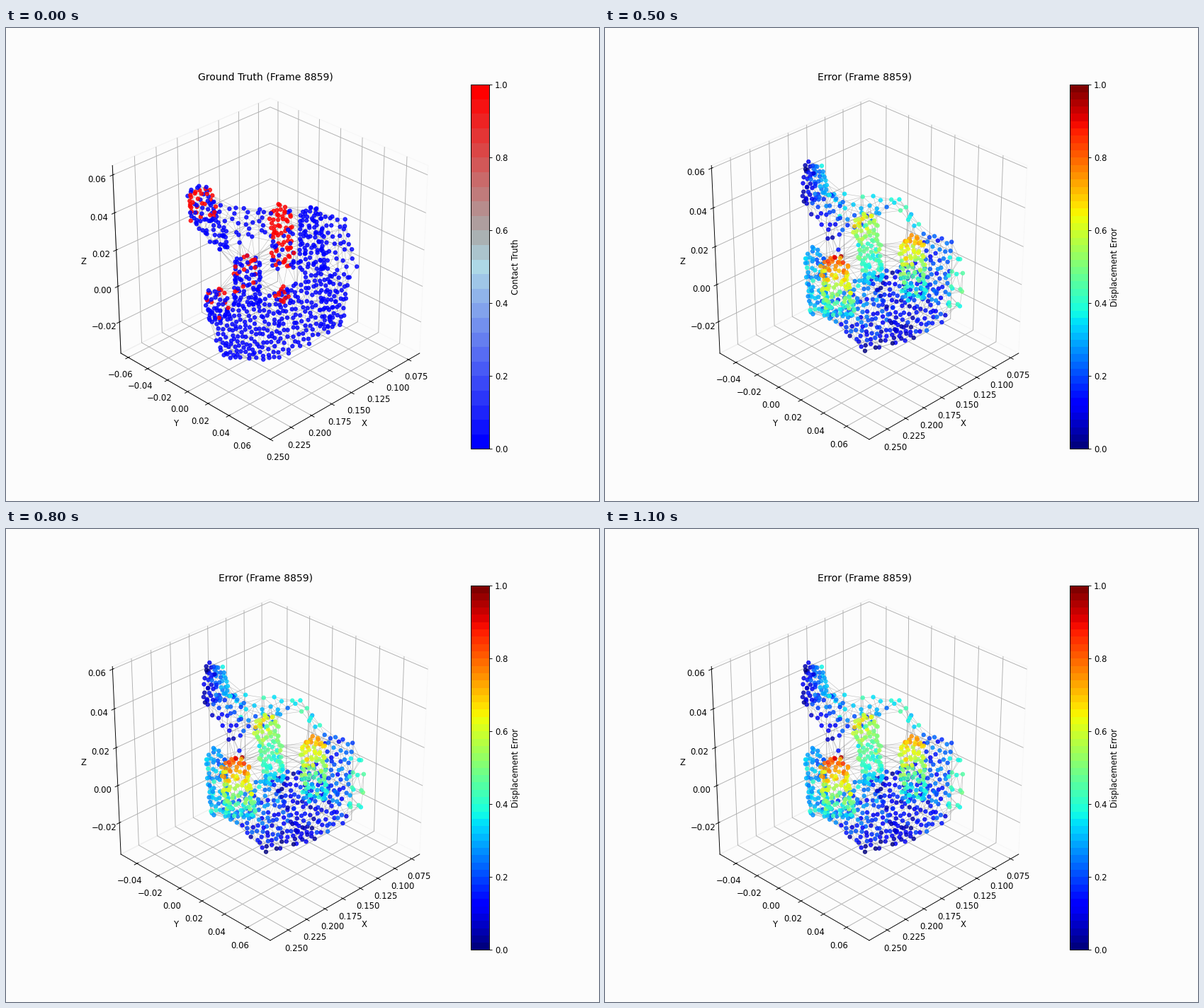
A matplotlib script that plays this animation: 837 by 669 pixels, repeating every 1.2 s.

```python
import numpy as np
import matplotlib.pyplot as plt
from matplotlib.animation import FuncAnimation
from matplotlib.cm import ScalarMappable
from matplotlib.collections import LineCollection
from matplotlib.colors import LinearSegmentedColormap
from matplotlib.tri import Triangulation

W, H, DPI = 837, 669, 83.7
rng = np.random.default_rng(8)

CONTACT = LinearSegmentedColormap.from_list(
    "contact",
    [(0, "blue"), (0.5, "lightblue"), (0.6, "darkgray"), (1, "red")], N=25)
ERROR = plt.get_cmap("jet", 50)


def spread(n):
    """Low-discrepancy pairs in the unit square."""
    i = np.arange(n)
    return (0.5 + i * 0.7549) % 1, (0.5 + i * 0.5698) % 1


def pack(xy, t, hit, err):
    """Rows of x, y, error, contact; both values run with t."""
    xy = xy + rng.normal(0, 1.2, xy.shape)
    error = err[0] + (err[1] - err[0]) * t + rng.normal(0, 0.05, len(t))
    contact = rng.random(len(t)) < hit[0] + (hit[1] - hit[0]) * t
    return np.column_stack([xy, np.clip(error, 0, 1), contact])


def tube(base, tip, radii, n, hit=(0, 0), err=(0, 0)):
    """Surface of a round-tipped finger, seen from the side."""
    base, tip = np.array(base), np.array(tip)
    t, turn = spread(n)
    r = radii[0] + (radii[1] - radii[0]) * t
    r = r * np.sqrt(1 - np.clip((t - 0.8) / 0.2, 0, 1) ** 2)
    axis = tip - base
    side = np.array([-axis[1], axis[0]]) / np.hypot(*axis)
    xy = base + t[:, None] * axis
    xy = xy + (r * np.cos(2 * np.pi * turn))[:, None] * side
    return pack(xy, t, hit, err)


def patch(p, q, r, s, n, hit=(0, 0), err=(0, 0)):
    """Four-cornered sheet; values run from edge ps to edge qr."""
    p, q, r, s = map(np.array, (p, q, r, s))
    u, v = spread(n)
    a, b = u[:, None], v[:, None]
    xy = (1 - b) * ((1 - a) * p + a * q) + b * ((1 - a) * s + a * r)
    return pack(xy, u, hit, err)


def true_hand():
    return np.vstack([
        # palm and back
        patch((286, 400), (392, 372), (375, 475), (306, 466), 140),
        patch((385, 375), (452, 335), (476, 426), (375, 474), 130),
        patch((452, 345), (488, 350), (478, 425), (440, 430), 45),
        patch((447, 262), (482, 268), (504, 345), (452, 350), 32),
        # thumb and web
        patch((294, 249), (372, 256), (374, 290), (311, 316), 32),
        tube((308, 312), (276, 262), (6, 17), 30),
        tube((280, 275), (273, 224), (19, 17), 62, (0.55, 0.55)),
        # fingers
        tube((392, 340), (387, 250), (15, 14), 85, (0.45, 1)),
        tube((433, 345), (430, 253), (18, 14), 95),
        tube((340, 392), (340, 321), (20, 17), 85, (0, 0.4)),
        tube((300, 415), (295, 367), (15, 13), 45, (0, 0.8)),
        tube((386, 384), (400, 366), (8, 6), 12, (0.85, 0.85)),
    ])


def posed_hand():
    return np.vstack([
        # palm and back
        patch((295, 388), (370, 458), (440, 435), (370, 350), 130,
              err=(0.3, 0.06)),
        patch((370, 350), (440, 328), (488, 412), (420, 449), 115,
              err=(0.08, 0.2)),
        patch((446, 286), (490, 302), (488, 405), (455, 370), 45,
              err=(0.2, 0.22)),
        tube((494, 394), (498, 308), (10, 10), 15, err=(0.42, 0.42)),
        # thumb and web
        patch((320, 228), (335, 300), (385, 275), (412, 243), 26,
              err=(0.38, 0.2)),
        tube((412, 243), (446, 290), (5, 5), 9, err=(0.4, 0.38)),
        patch((279, 250), (318, 228), (338, 240), (333, 322), 32,
              err=(0.07, 0.32)),
        patch((274, 250), (320, 235), (304, 190), (284, 190), 56,
              (0.5, 0.5), (0.04, 0.33)),
        # fingers
        tube((303, 405), (294, 311), (14, 13), 75, (0, 0.5), (0.34, 0.26)),
        tube((332, 410), (322, 324), (22, 17), 105, (0, 0.5), (0.34, 0.84)),
        tube((380, 360), (366, 264), (13, 17), 100, (0, 0.9), (0.34, 0.6)),
        tube((437, 385), (432, 294), (17, 14), 95, (0, 0.1), (0.3, 0.74)),
    ])


def mesh(xy, reach=38):
    """Edges of two interleaved triangulations, without long ones."""
    out = []
    order = rng.permutation(len(xy))
    for half in (order[::2], order[1::2]):
        p = xy[half]
        seg = p[Triangulation(*p.T).edges]
        length = np.hypot(*(seg[:, 0] - seg[:, 1]).T)
        out.append(seg[length < reach])
    return np.vstack(out)


def scene(title, label, hand, edges, column, cmap, box):
    ax = fig.add_subplot(111, projection="3d")
    bar = fig.colorbar(ScalarMappable(plt.Normalize(0, 1), cmap), ax=ax,
                       label=label)
    ax.set(title=title, xlabel="X", ylabel="Y", zlabel="Z",
           xlim=box[0], ylim=box[1], zlim=box[2], facecolor="none")
    ax.set_box_aspect((1, 1, 1))
    ax.view_init(elev=30, azim=45)
    for axis in (ax.xaxis, ax.yaxis, ax.zaxis):
        axis.pane.fill = False

    # The hand is laid over the axes in pixel coordinates.
    top = fig.add_axes([0, 0, 1, 1], zorder=5)
    top.set(xlim=(0, W), ylim=(H, 0))
    top.axis("off")
    top.add_collection(LineCollection(edges, colors="gray", linewidths=0.5,
                                      alpha=0.5))
    top.scatter(hand[:, 0], hand[:, 1], s=20, c=hand[:, column], cmap=cmap,
                vmin=0, vmax=1, alpha=0.8, zorder=3)
    return ax, bar.ax, top


fig = plt.figure(figsize=((W + 0.01) / DPI, (H + 0.01) / DPI), dpi=DPI,
                 facecolor="#fcfcfc")

truth, posed = true_hand(), posed_hand()
truth_edges, posed_edges = mesh(truth[:, :2]), mesh(posed[:, :2])
truth_box = (0.0599, 0.2501), (-0.0677, 0.0784), (-0.0379, 0.0649)
posed_box = (0.0630, 0.2739), (-0.0554, 0.0793), (-0.0373, 0.06135)

scenes = [
    scene("Ground Truth (Frame 8859)", "Contact Truth",
          truth, truth_edges, 3, CONTACT, truth_box),
    scene("Prediction (Frame 8859)", "Contact Prediction",
          posed, posed_edges, 3, CONTACT, posed_box),
    scene("Error (Frame 8859)", "Displacement Error",
          posed, posed_edges, 2, ERROR, posed_box),
]


def update(i):
    for k, axes in enumerate(scenes):
        for a in axes:
            a.set_visible(k == i % len(scenes))
    return []


anim = FuncAnimation(fig, update, frames=12, interval=100, repeat=True,
                     repeat_delay=0, blit=False)
plt.show()
```
